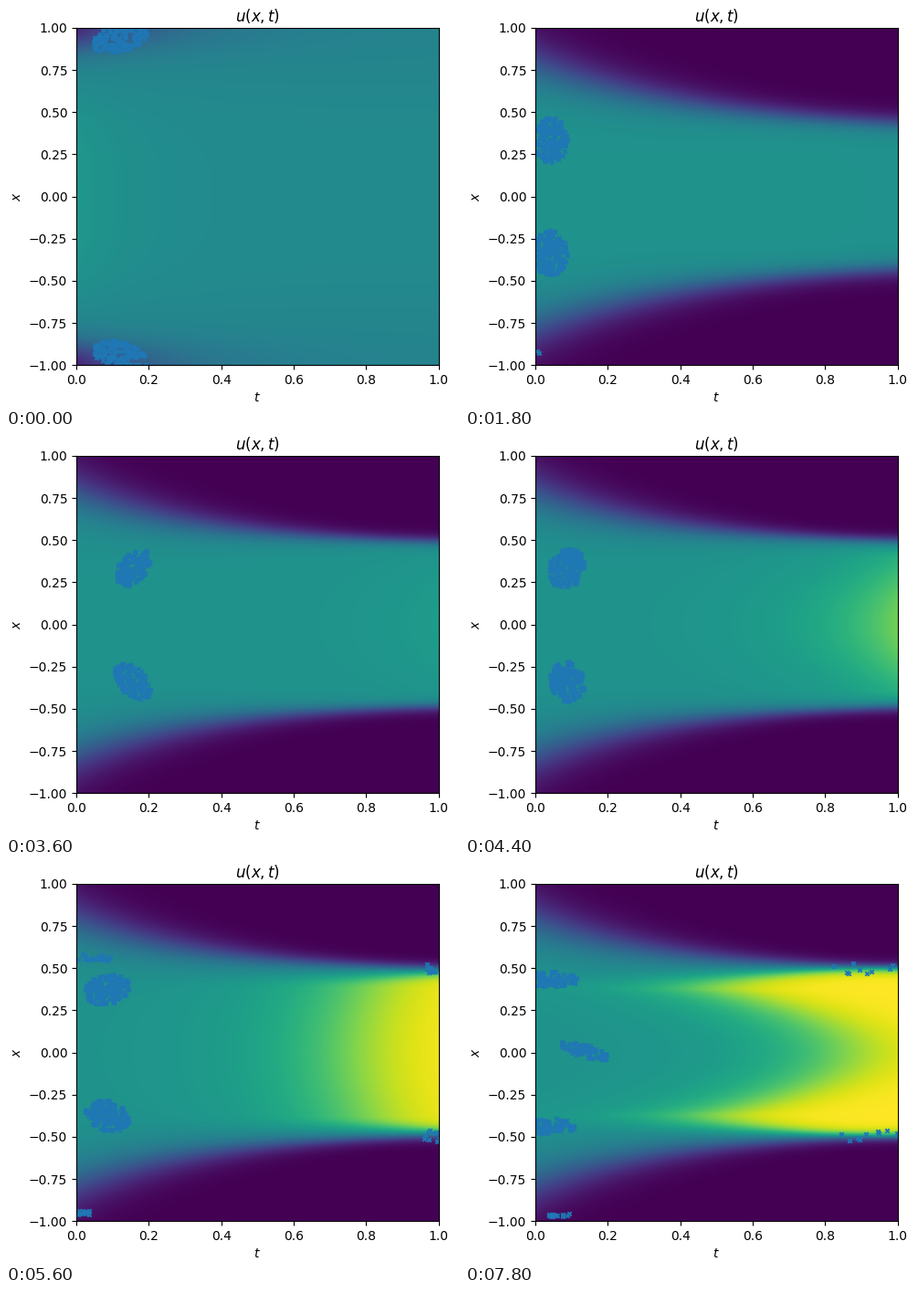
Animation of 496x438 px, one loop 8000 ms. Source, as a matplotlib script:

```python
import numpy as np
import matplotlib.pyplot as plt
from matplotlib.animation import FuncAnimation

W, H, DPI = 496, 438, 100
FRAMES, STEP_MS = 40, 200
AX_LEFT, AX_BOTTOM, AX_W, AX_H = 77.0, 44.6, 396.8, 369.6
POINT_DENSITY = 0.11  # collocation points per square pixel
WARMUP = 3            # frames until the front appears
LATE = 25             # frame at which the reaction reaches t = 1

T, X = np.meshgrid(np.linspace(0, 1, 397), np.linspace(-1, 1, 370))
A = np.abs(X)


def sigmoid(z):
    return 1 / (1 + np.exp(-np.clip(z, -40, 40)))


def smooth(f, start, end):
    s = np.clip((f - start) / (end - start), 0, 1)
    return s * s * (3 - 2 * s)


def untrained(f):
    """Share of the initial state left: 1 at the start, 0 after warm-up."""
    return max(0, 1 - f / WARMUP) ** 2


def early_field():
    corner = np.exp(-T / 0.22) * sigmoid((A - 0.9) / 0.05)
    left = np.exp(-T / 0.16) * np.exp(-(A / 0.62) ** 4)
    return -0.10 + 0.05 * np.exp(-(A / 0.7) ** 4) + 0.11 * left - 0.8 * corner


def trained_field(f):
    lag = np.exp(-max(f - WARMUP, 0) / 5)

    # Front narrowing from |x| = 0.79 at t = 0 to its position at t = 1
    edge = 0.502 - 0.225 * lag
    tau = 0.36 + 4.6 * lag ** 3
    width = 0.017 + 0.05 * lag
    end = np.exp(-1 / tau)
    decay = (np.exp(-T / tau) - end) / (1 - end)
    front = sigmoid((edge + (0.79 - edge) * decay - A)
                    / (width + (0.09 - width) * (1 - T) ** 2))

    # Allen-Cahn reaction: u = v / sqrt(1 + v^2), v growing exponentially
    rise = 0.78 + 0.12 * (abs(f - 32) / 7) ** 2.4
    bend = 1.1 - 0.27 * max(f - LATE, 0)
    onset = (rise + bend * np.minimum(A, 0.37) ** 2
             + 25 * np.maximum(A - 0.37, 0) ** 2)
    v = np.exp(6 * (T - onset))
    core = 0.02 + 0.98 * v / np.sqrt(1 + v * v) - 0.32 * lag ** 3 * T ** 6
    return -1 + (1 + core) * front


def field(f):
    k = untrained(f)
    return k * early_field() + (1 - k) * trained_field(f)


def cloud(rng, t, x, rt, rx, tilt=0):
    """Dense ellipse of points, sheared by tilt, cut off at t = 0 and |x| = 1."""
    n = int(POINT_DENSITY * np.pi * rt * AX_W * rx * AX_H / 2)
    r, a = np.sqrt(rng.random(n)), rng.uniform(0, 2 * np.pi, n)
    dt, dx = r * np.cos(a), r * np.sin(a)
    pts = np.column_stack([t + rt * dt, x + rx * dx + tilt * dt])
    return pts[(pts[:, 0] >= 0) & (np.abs(pts[:, 1]) <= 1)]


def sprinkle(rng, n, t0, t1, x, spread):
    n = int(round(n))
    return np.column_stack([rng.uniform(t0, t1, n),
                            x + rng.uniform(-spread, spread, n)])


def points(f):
    rng = np.random.default_rng(100 + f)
    start, late = untrained(f), smooth(f, LATE, 32)
    fade = np.clip((f - 32) / 7, 0, 1)
    parts = []

    # Mirrored pair swinging away from t = 0 and back
    swing = 0.5 - 0.5 * np.cos(2 * np.pi * (max(f, 11) - 11) / 14)
    for side in (1, -1):
        parts.append(cloud(
            rng, 0.04 + 0.115 * swing + 0.08 * start,
            side * (0.335 + 0.1 * late + 0.605 * start),
            0.05 + 0.03 * late + 0.025 * start,
            0.135 - 0.09 * late - 0.05 * start - 0.04 * swing * (1 - late),
            side * 0.05 * (swing * (1 - 0.5 * late) + 0.6 * start)))

    # Third cloud on the axis, moving right and flattening
    grow = smooth(f, 28, 32)
    if grow > 0:
        parts.append(cloud(rng, 0.015 + 0.12 * fade, 0.01 * fade,
                           (0.03 + 0.04 * fade) * grow,
                           (0.09 - 0.05 * fade) * grow, -0.04 * fade))

    # Loose points: lower wall, shoulder of the front, both front tips
    wall = 12 * max(0, 1 - abs(f - WARMUP) / 7) * (1 - start) + late * (30 - 18 * fade)
    parts.append(sprinkle(rng, wall, 0, 0.02 + 0.04 * late + 0.04 * fade,
                          -0.93 - 0.055 * late + 0.02 * fade, 0.015))
    parts.append(sprinkle(rng, 50 * late * (1 - fade), 0, 0.095, 0.565, 0.02))
    for side in (1, -1):
        parts.append(sprinkle(rng, late * (24 - 15 * fade), 0.96 - 0.14 * fade, 1,
                              side * 0.495, 0.035))
    return np.vstack(parts)


fig = plt.figure(figsize=(W / DPI, H / DPI), dpi=DPI)
ax = fig.add_axes([AX_LEFT / W, AX_BOTTOM / H, AX_W / W, AX_H / H])
image = ax.imshow(field(0), extent=(0, 1, -1, 1), origin="lower", aspect="auto",
                  cmap="viridis", vmin=-1, vmax=1, interpolation="nearest")
dots = ax.scatter([], [], s=10, marker="x", color="tab:blue")
ax.set(xlim=(0, 1), ylim=(-1, 1))
ax.set_title("$u(x, t)$", pad=4.9)
ax.set_xlabel("$t$", labelpad=3.3)
ax.set_ylabel("$x$")


def draw(f):
    image.set_data(field(f))
    dots.set_offsets(points(f))
    return image, dots


anim = FuncAnimation(fig, draw, frames=FRAMES, interval=STEP_MS,
                     init_func=lambda: draw(0), repeat=True, repeat_delay=0)
plt.show()
```
